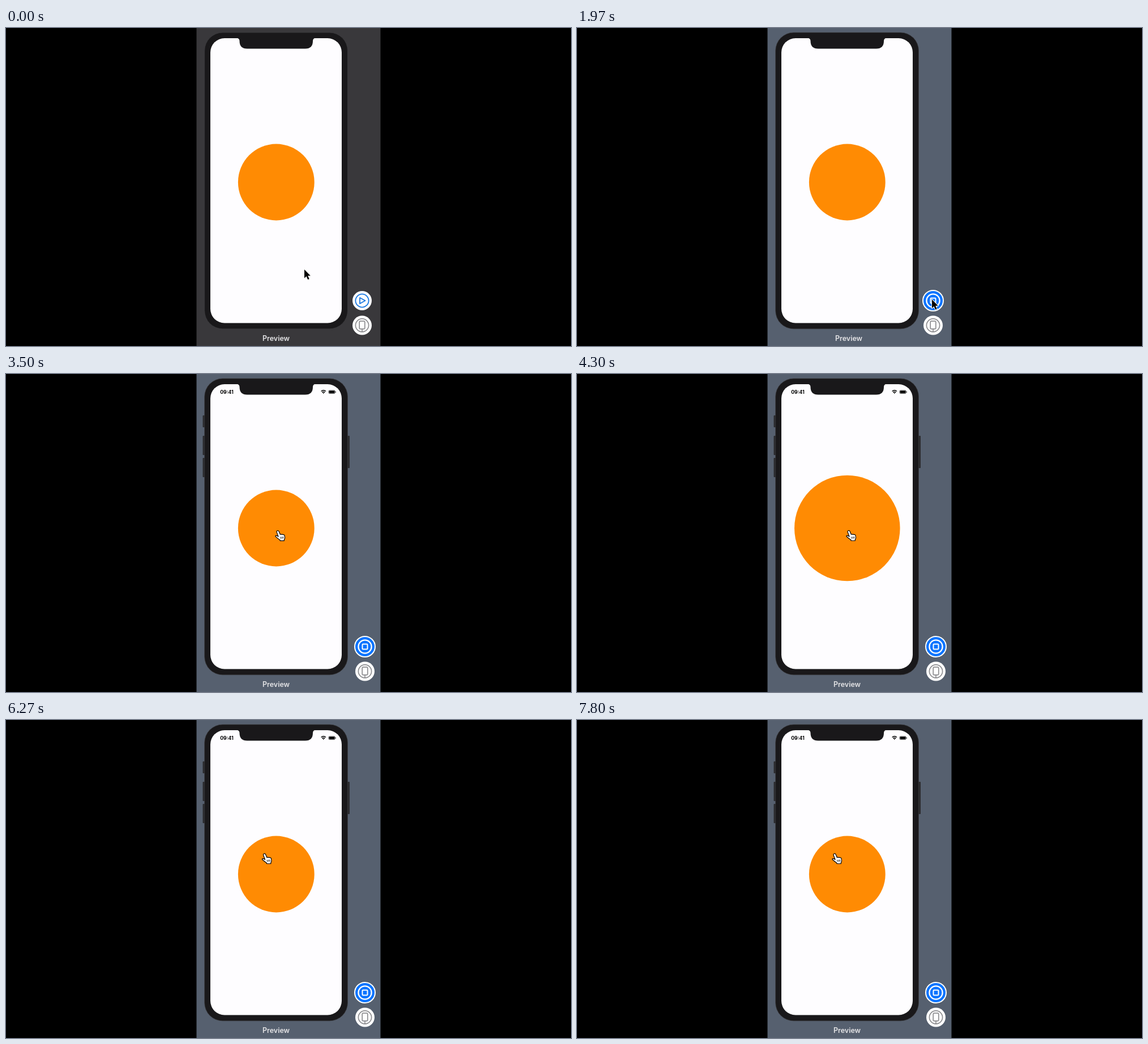
An HTML page for the animation above (7.83 s loop, 998 by 561 pixels).

```html
<!DOCTYPE html>
<html lang="en">
<head>
<meta charset="utf-8">
<title>Tap preview</title>
<style>
  html, body { margin: 0; width: 100%; height: 100%; overflow: hidden; background: #000; }
  svg { display: block; width: 100vw; height: 100vh; }
  text { font-family: Inter, sans-serif; text-anchor: middle; }
</style>
</head>
<body>
<svg viewBox="0 0 998 561">
  <rect width="998" height="561"/>
  <rect id="panel" x="336.5" width="325" height="561"/>

  <g id="sideKeys" fill="#2b2b2e">
    <rect x="347.5" y="73" width="6" height="21" rx="1"/>
    <rect x="347.5" y="109" width="6" height="34" rx="1"/>
    <rect x="347.5" y="148" width="6" height="34" rx="1"/>
    <rect x="600" y="109" width="7" height="57" rx="1"/>
  </g>
  <rect x="350.7" y="8" width="252.8" height="522.8" rx="32" fill="#19181a" stroke="#3e3e41" stroke-width=".7"/>
  <rect id="backing" x="361" y="18" width="232" height="502.5"/>
  <rect x="361" y="18" width="232" height="502.5" rx="25" fill="#fefdff"/>
  <path id="notch" d="M407 17.5Q412.5 18 412.5 23Q412.5 36.5 426 36.5H528.5Q542 36.5 542 23Q542 18 547 17.5Z"/>

  <g id="status">
    <text x="390" y="35.2" font-size="8.7" font-weight="700">09:41</text>
    <g fill="none" stroke="#000" stroke-width="1.4">
      <path d="M556.6 30.6Q560.8 26.8 565 30.6M558.3 32.6Q560.8 30.4 563.3 32.6"/>
      <rect x="569.9" y="28.9" width="11.4" height="5.6" rx="1.6" stroke-width=".6"/>
    </g>
    <path d="M559.5 33.6Q560.8 32.6 562.1 33.6L560.8 35Z"/>
    <rect x="570.6" y="29.6" width="10" height="4.2" rx="1"/>
    <rect x="582" y="30.7" width=".8" height="2" rx=".4"/>
  </g>

  <circle id="dot" cx="477.3" cy="272" fill="#ff8b03"/>
  <text id="label" y="552" font-size="12.5" font-weight="600" fill="#e4e4e6">Preview</text>

  <g id="controls" fill="none">
    <g id="play" stroke="#1777e2" stroke-width="1.8" stroke-linejoin="round">
      <circle cy="481" r="17" fill="#fff" stroke="none"/>
      <circle cy="481" r="11.6"/>
      <path d="M-4 475.8L5.5 481L-4 486.2Z"/>
    </g>
    <g id="stop" stroke="#fff" stroke-width="2">
      <circle cy="481" r="18" fill="#0a74ff"/>
      <circle cy="481" r="11.6" stroke-width="2.3"/>
      <rect x="-4.5" y="476.5" width="9" height="9" rx="1.2"/>
    </g>
    <g stroke="#8d8d90" stroke-width="1.7">
      <circle cy="524.5" r="17" fill="#fff" stroke="none"/>
      <circle cy="524.5" r="11.6"/>
      <rect x="-4.8" y="517.2" width="9.6" height="13.6" rx="1.8"/>
      <path d="M0 531V536"/>
    </g>
  </g>

  <g id="cursor" stroke-linejoin="round">
    <g id="arrow">
      <path d="M0 0V15.3L3.5 12L6.1 17.8L8.7 16.7L6.2 11H10.8Z" transform="translate(.6 1.2)" opacity=".25"/>
      <path d="M0 0V15.3L3.5 12L6.1 17.8L8.7 16.7L6.2 11H10.8Z" stroke="#fff" stroke-width="1.8" paint-order="stroke"/>
    </g>
    <g id="hand" stroke="#000" stroke-width="1.2">
      <path fill="#fff" d="M1 .5Q3 -.5 4 1.5L6.3 7Q7.5 6 9 7.2Q10.5 6.2 11.8 7.5Q13.5 7 14 9L14.5 13Q14.3 15 13.3 16V18H6V16.8Q2 14 -1.5 11Q-2.8 9.2 -1 8.8Q.5 8.8 3 10.8L0 2.5Q-.3 1 1 .5Z"/>
      <path d="M6.6 11.3L7.2 14.6M9 11L9.5 14.4M11.3 10.7L11.7 14.1" stroke-width=".9"/>
    </g>
  </g>
</svg>
<script>
const LOOP = 7830;
const el = Object.fromEntries([...document.querySelectorAll('[id]')].map(e => [e.id, e]));

const ease = (t, from, to) => {
  const x = Math.min(1, Math.max(0, (t - from) / (to - from)));
  return x * x * (3 - 2 * x);
};
const mix = (a, b, k) => a + (b - a) * k;
const mixColor = (a, b, k) => `rgb(${a.map((v, i) => Math.round(mix(v, b[i], k)))})`;
const set = (e, attrs) => { for (const k in attrs) e.setAttribute(k, attrs[k]); };

// Pointer moves: start, end, target x, target y
const moves = [
  [10, 710, 629, 479], [810, 980, 627, 479],
  [2750, 3510, 478, 276], [5380, 5760, 449, 257],
  [5760, 6280, 454.5, 235.5], [7550, 7800, 453, 235.5]
];

function pointerAt(t) {
  let x = 527, y = 426;
  for (const [from, to, tx, ty] of moves) {
    const k = ease(t, from, to);
    x = mix(x, tx, k);
    y = mix(y, ty, k);
  }
  return [x, y];
}

function render(t) {
  const live = ease(t, 1170, 1930);
  const attach = ease(t, 2060, 2400);
  const screenOn = ease(t, 2380, 2560);
  const swap = ease(t, 1170, 1450);
  const press = ease(t, 3780, 4130) - ease(t, 4260, 4600)
              + ease(t, 6650, 7000) - ease(t, 7150, 7500);
  const backing = screenOn * (1 - ease(t, 2630, 2735));

  set(el.panel, { fill: mixColor([57, 56, 59], [86, 96, 111], live) });
  set(el.sideKeys, { opacity: attach });
  set(el.status, { opacity: screenOn });
  set(el.backing, { opacity: backing });
  set(el.notch, { fill: mixColor([25, 24, 26], [0, 0, 0], backing) });
  set(el.dot, { r: 67.4 * (1 + 0.4 * press) });
  set(el.label, { x: 477 + 3 * (live - attach) });
  set(el.controls, { transform: `translate(${629 + 5 * attach} 0)` });
  set(el.play, { opacity: swap < 1 ? 1 : 0 });
  set(el.stop, { opacity: swap });

  const [x, y] = pointerAt(t);
  const overScreen = x < 593 && t > 2750;
  set(el.cursor, { transform: `translate(${x} ${y})` });
  set(el.arrow, { opacity: overScreen ? 0 : 1 });
  set(el.hand, { opacity: overScreen ? 1 : 0 });
}

const start = performance.now();
function tick() {
  render((performance.now() - start) % LOOP);
  requestAnimationFrame(tick);
}
tick();
</script>
</body>
</html>
```
